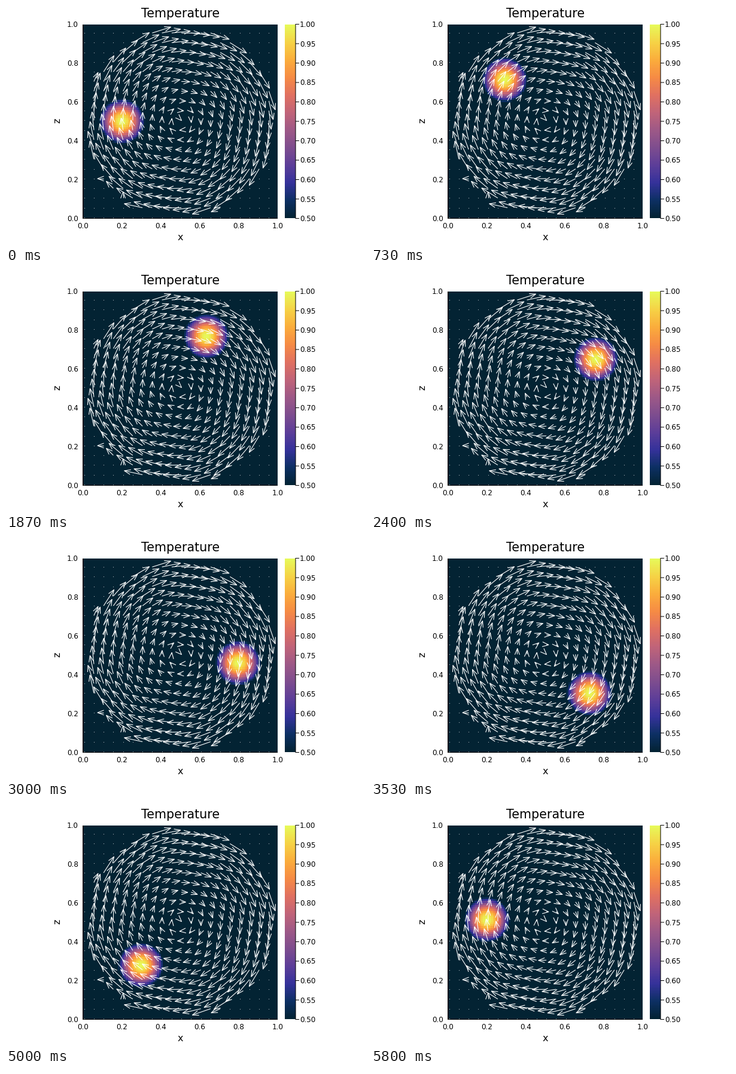
Recreate the animation shown at these times as a matplotlib script. Size 600 by 400 pixels, loop 5.87 s.

```python
import numpy as np
import matplotlib.pyplot as plt
from matplotlib.animation import FuncAnimation
from matplotlib.collections import LineCollection
from matplotlib.colors import LinearSegmentedColormap

W, H, DPI = 600, 400, 100
POSES, SUB, LOOP_MS = 88, 3, 5870     # each pose is held for SUB ticks
X0, Y0, SIDE = 129, 355.5, 325        # lower left corner and side of the plot
TOP, BOTTOM = 31, 355                 # pixel rows of the colour fields
TURN = np.radians(360 / 86.4)         # turn of the blob per pose
N, CELL = 100, 0.01
ARROW_SCALE, MASK_R = 0.21, 0.49

thermal = LinearSegmentedColormap.from_list("thermal", np.array([
    (3, 35, 51), (13, 48, 100), (53, 50, 155), (93, 62, 153),
    (126, 77, 143), (158, 89, 135), (193, 100, 121), (225, 113, 97),
    (246, 139, 69), (251, 173, 60), (246, 211, 70), (231, 250, 90)]) / 255)

plt.rcParams["font.family"] = "DejaVu Sans"
fig = plt.figure(figsize=(W / DPI, H / DPI), dpi=DPI, facecolor="white")
ax = fig.add_axes([0, 0, 1, 1])
ax.set_axis_off()


def pt(px):
    return px * 72 / DPI


def to_px(x, z):
    return X0 + SIDE * x, Y0 - SIDE * z


def label(x, y, s, size, ha="center", va="center_baseline", **kw):
    ax.text(x, y, s, fontsize=pt(size), ha=ha, va=va, color="black", **kw)


def line(xs, ys):
    ax.plot(xs, ys, color="black", lw=pt(1), solid_capstyle="butt",
            snap=False, zorder=4)


def field(data, left, right):
    return ax.imshow(data, cmap=thermal, origin="lower", interpolation="nearest",
                     extent=(left, right, BOTTOM, TOP))


def inside(x, z):
    return np.hypot(x - 0.5, z - 0.5) < MASK_R


def velocity(x, z):
    """Clockwise rotation on masked cell faces, averaged to the cell centre."""
    d = CELL / 2
    u = (z - 0.5) * (inside(x - d, z) * 0.5 + inside(x + d, z) * 0.5)
    w = (0.5 - x) * (inside(x, z - d) * 0.5 + inside(x, z + d) * 0.5)
    return u, w


def arrow(x, z, length=10.5, half=4):
    u, w = velocity(x, z)
    tail = np.array(to_px(x, z))
    step = ARROW_SCALE * SIDE * np.array([u, -w])
    size = np.hypot(*step)
    if size < 1e-6:
        return None
    tip = tail + step
    along = step / size
    side = np.array([-along[1], along[0]])
    back = tip - length * along
    return [tail, tip], [back + half * side, tip, back - half * side]


# temperature field
centers = (np.arange(N) + 0.5) * CELL
gx, gz = np.meshgrid(centers, centers)


def temperature(pose):
    a = pose * TURN
    cx, cz = 0.5 - 0.3 * np.cos(a), 0.5 + 0.3 * np.sin(a)
    return np.exp(-((gx - cx) ** 2 + (gz - cz) ** 2) / (2 * 0.1 ** 2))


heat = field(temperature(0), X0, X0 + SIDE)
heat.set_clim(0.5, 1)

# flow arrows, with a dot where the flow is at rest
segments, dots = [], []
for x in centers[::5]:
    for z in centers[::5]:
        parts = arrow(x, z)
        if parts:
            segments.extend(parts)
        else:
            dots.append(to_px(x, z))
ax.add_collection(LineCollection(segments, colors="white", linewidths=pt(1.1),
                                 zorder=3))
ax.scatter(*np.transpose(dots), s=pt(1.1) ** 2, c="white", lw=0, alpha=0.8, zorder=3)

# axes
line([X0 - 0.5, X0 - 0.5], [TOP, BOTTOM + 1])
line([X0 - 1, X0 + SIDE], [BOTTOM + 0.5, BOTTOM + 0.5])
for v in np.linspace(0, 1, 6):
    px, py = to_px(v, v)
    label(px, 367.5, f"{v:.1f}", 12)
    label(121, py - 0.5, f"{v:.1f}", 12, ha="right")
label(291.5, 386.5, "x", 16)
label(85.5, 192.3, "z", 16, va="center", rotation=90)
label(292, 10.8, "Temperature", 20.6)

# colour bar
field(np.linspace(0, 1, 256)[:, None], 466, 484)
line([484, 484], [TOP - 1, BOTTOM + 1])
for v in np.linspace(0.5, 1, 11):
    py = Y0 - SIDE * (v - 0.5) * 2
    line([484, 490], [py, py])
    label(491, py - 0.5, f"{v:.2f}", 12, ha="left")

ax.set_xlim(0, W)
ax.set_ylim(H, 0)
ax.set_aspect("auto")


def update(tick):
    heat.set_data(temperature(min((tick + 1) // SUB, POSES - 1)))
    return [heat]


anim = FuncAnimation(fig, update, frames=POSES * SUB,
                     interval=LOOP_MS / (POSES * SUB),
                     repeat=True, repeat_delay=0, blit=False)
plt.show()
```
